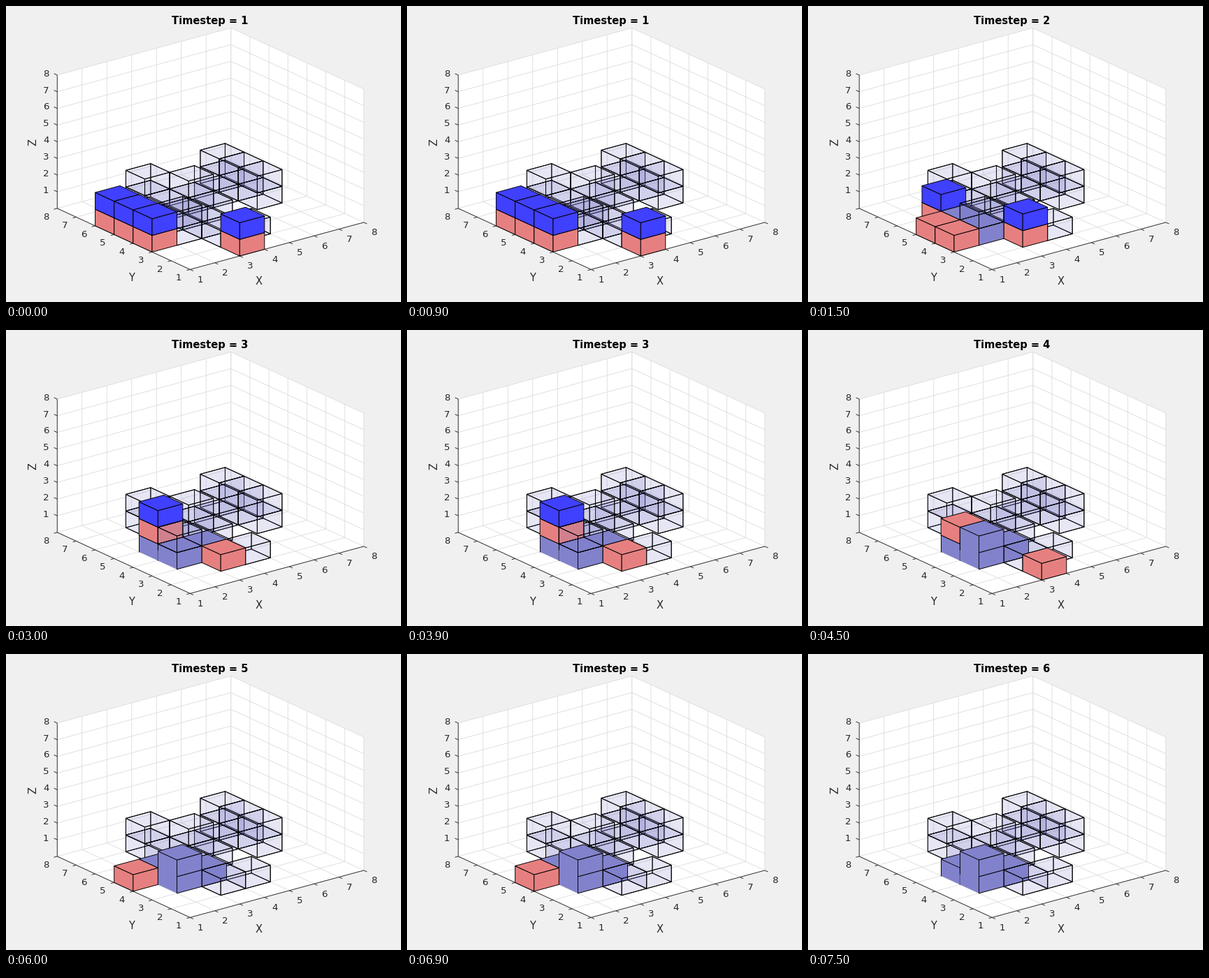
Animation of 565x424 px, one loop 8000 ms. Source, as a matplotlib script:

```python
import numpy as np
import matplotlib.pyplot as plt
from matplotlib.animation import FuncAnimation
from matplotlib.collections import LineCollection, PolyCollection

W, H, DPI = 565, 424, 100
PX = 72 / DPI  # points per pixel

ORIGIN = np.array([263.3, 377.4])
UX = np.array([35.5, -9.64])
UY = np.array([-27.15, -12.5])
UZ = np.array([0, -23.87])

INK = "#262626"
RED = (0.9, 0.5, 0.5, 1)
BLUE = (0.25, 0.25, 1, 1)
BUILT = (0.51, 0.51, 0.8, 1)
PLAN = (0.5, 0.5, 0.8, 0.1)
BLACK = (0, 0, 0, 1)
CLEAR = (0, 0, 0, 0)

# cells of the planned structure
plan = [(3, 2, 0), (4, 2, 0), (2, 3, 0), (3, 3, 0), (2, 3, 1), (2, 4, 0),
        (3, 4, 0), (4, 4, 0), (3, 5, 0), (4, 5, 0), (4, 5, 1), (5, 5, 0),
        (3, 6, 0), (3, 6, 1)]
plan += [(6, y, z) for y in (4, 5, 6) for z in (0, 1)]

build_order = [(2, 3, 0), (2, 4, 0), (3, 3, 0), (2, 3, 1)]
built_count = [0, 2, 3, 4, 4, 4]
# red blocks of each step; those with True carry a blue block
blocks = [
    [(1, 3, 0, True), (1, 4, 0, True), (1, 5, 0, True), (3, 1, 0, True)],
    [(1, 3, 0, False), (1, 4, 0, False), (2, 5, 0, True), (3, 2, 0, True)],
    [(2, 4, 1, True), (3, 2, 0, False)],
    [(2, 4, 1, False), (3, 1, 0, False)],
    [(1, 4, 0, False)],
    [],
]


def project(x, y, z):
    return ORIGIN + (x - 1) * UX + (y - 1) * UY + z * UZ


def x_face(x, y, z):
    return [project(x, y + a, z + b) for a, b in ((0, 0), (1, 0), (1, 1), (0, 1))]


def y_face(x, y, z):
    return [project(x + a, y, z + b) for a, b in ((0, 0), (1, 0), (1, 1), (0, 1))]


def z_face(x, y, z):
    return [project(x + a, y + b, z) for a, b in ((0, 0), (1, 0), (1, 1), (0, 1))]


def scene(step):
    """Polygons, fills and edges of one step, back to front."""
    cells = {c: PLAN for c in plan}
    cells.update({c: BUILT for c in build_order[:built_count[step]]})
    for x, y, z, loaded in blocks[step]:
        cells[x, y, z] = RED
        if loaded:
            cells[x, y, z + 1] = BLUE

    polys, fills, edges = [], [], []

    def add(poly, fill, edge=BLACK):
        polys.append(poly)
        fills.append(fill)
        edges.append(edge)

    for x, y, z in sorted(cells, key=lambda c: (-c[0], -c[1], c[2])):
        fill = cells[x, y, z]
        if fill == PLAN:
            add(z_face(x, y, z), fill)
            add(x_face(x + 1, y, z), fill)
            add(y_face(x, y + 1, z), fill)
        solid = fill == BUILT
        add(x_face(x, y, z), fill, CLEAR if solid else BLACK)
        add(y_face(x, y, z), fill)
        covered = solid and cells.get((x, y, z + 1)) == BUILT
        add(z_face(x, y, z + 1), fill, CLEAR if covered else BLACK)
        if solid:
            low = 0.66 if cells.get((x, y + 1, z)) == BUILT else 0
            add([project(x, y + 1, z + 1), project(x, y + 1, z + low)], CLEAR)
    return polys, fills, edges


fig = plt.figure(figsize=(W / DPI, H / DPI), dpi=DPI, facecolor="#f0f0f0")
ax = fig.add_axes([0, 0, 1, 1])
ax.set_xlim(0, W)
ax.set_ylim(H, 0)
ax.axis("off")


def label(pos, text, size, **kw):
    kw = {"color": INK, "ha": "center", "va": "center_baseline", **kw}
    return ax.text(*pos, text, fontsize=size * PX, family="DejaVu Sans", **kw)


def draw_axes():
    walls = [[project(1, 1, 0), project(8, 1, 0), project(8, 8, 0), project(1, 8, 0)],
             [project(1, 8, 0), project(8, 8, 0), project(8, 8, 8), project(1, 8, 8)],
             [project(8, 1, 0), project(8, 8, 0), project(8, 8, 8), project(8, 1, 8)]]
    ax.add_collection(PolyCollection(walls, facecolors="white", edgecolors="none"))

    grid, ticks = [], []
    for k in range(1, 9):
        grid += [[project(k, 1, 0), project(k, 8, 0), project(k, 8, 8)],
                 [project(1, k, 0), project(8, k, 0), project(8, k, 8)],
                 [project(1, 8, k), project(8, 8, k), project(8, 1, k)]]
        px, py, pz = project(k, 1, 0), project(1, k, 0), project(1, 8, k)
        ticks += [[px, px + (4.6, 2.1)], [py, py + (-4.8, 1.3)], [pz, pz + (-4.6, -2.1)]]
        label(px + (14.6, 13.3), str(k), 13.33)
        label(py + (-16.2, 11), str(k), 13.33)
        label(pz + (-16, -3.2), str(k), 13.33)
    ax.add_collection(LineCollection(grid, colors="#dedede", linewidths=0.9 * PX))
    frame = [[project(8, 1, 0), project(1, 1, 0), project(1, 8, 0), project(1, 8, 8)]]
    ax.add_collection(LineCollection(frame + ticks, colors=INK, linewidths=0.9 * PX))

    label((362, 393), "X", 14.67)
    label((179, 388), "Y", 14.67)
    label((39, 194.5), "Z", 14.67, rotation=90, va="center")


draw_axes()
title = label((291.8, 20), "", 14.67, weight="bold", color="black")
cubes = PolyCollection([], linewidths=0.95 * PX, joinstyle="round", zorder=3)
ax.add_collection(cubes)


def update(i):
    step = i // 3
    polys, fills, edges = scene(step)
    cubes.set_verts(polys)
    cubes.set_facecolor(fills)
    cubes.set_edgecolor(edges)
    title.set_text(f"Timestep = {step + 1}")
    return cubes, title


anim = FuncAnimation(fig, update, frames=16, interval=500, repeat=True,
                     repeat_delay=0, init_func=lambda: update(0))
plt.show()
```
